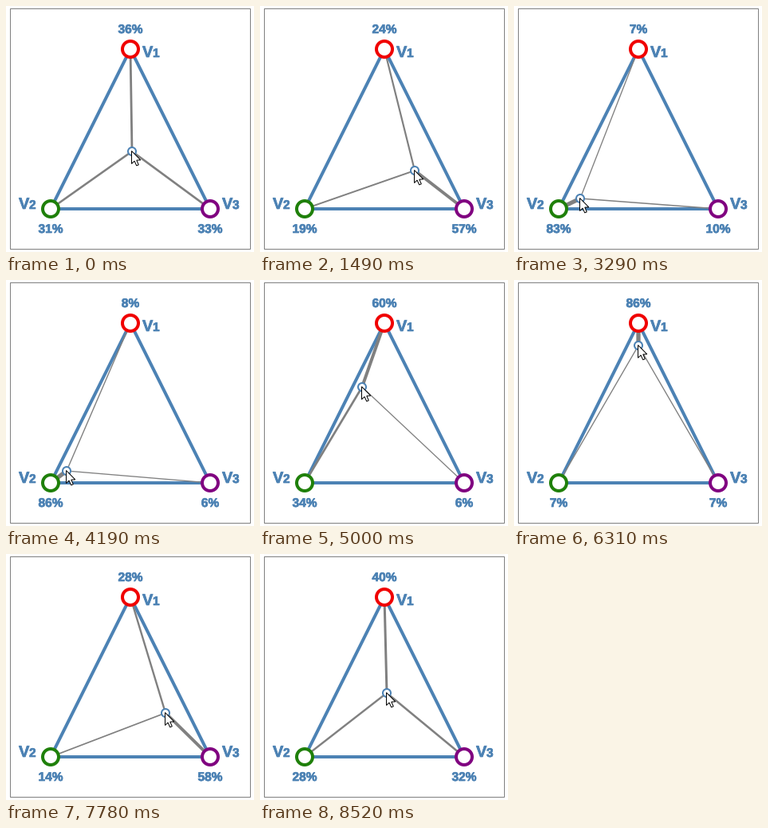
A matplotlib script for the animation above (9.52 s loop, 311 px wide and 308 px high).

```python
import math

import matplotlib.pyplot as plt
from matplotlib.animation import FuncAnimation
from matplotlib.patches import Circle, Polygon, Rectangle
from matplotlib.patheffects import withStroke

WIDTH, HEIGHT, DPI = 311, 308, 100
LOOP_MS, TICK_MS = 9520, 20
PX = 72 / DPI  # points per pixel

BLUE, GRAY = "#4c82b4", "#808080"
CORNERS = [(156, 54), (56, 254), (256, 254)]
RING_COLORS = ["#f00000", "#1f800a", "#800080"]
START = (158, 182)

# first step ms, last step ms, step count, bend point (None = straight), end
MOVES = [
    (840, 1900, 14, None, (209, 216)),
    (2480, 3370, 12, (137.5, 238), (81, 241)),
    (3620, 3860, 4, None, (75, 240)),
    (4190, 5560, 18, None, (155, 80)),
    (6310, 7290, 13, None, (208, 204)),
    (7620, 8520, 12, None, (159, 174)),
]

ARROW = [(0, 0), (0, 16), (3.6, 12.6), (6.2, 18.4), (8.8, 17.3),
         (6.3, 11.6), (11.3, 11.4)]

# keep half-pixel geometry where it is instead of rounding it
plt.rcParams["path.snap"] = False


def smooth(u):
    return u * u * (3 - 2 * u)


def bend(a, c, b, u):
    return (1 - u) ** 2 * a + 2 * u * (1 - u) * c + u * u * b


def handle_at(ms):
    """Whole-pixel handle position; the drag advances in discrete steps."""
    pos = START
    for first, last, steps, mid, end in MOVES:
        if ms < first:
            break
        step = math.floor((ms - first) / (last - first) * (steps - 1) + 0.1)
        u = smooth(min(step + 1, steps) / steps)
        if mid is None:
            mid = [(a + b) / 2 for a, b in zip(pos, end)]
        pos = tuple(bend(a, c, b, u) for a, c, b in zip(pos, mid, end))
    return tuple(math.floor(v + 0.5) for v in pos)


def weights(x, y):
    top = (254 - y) / 200
    lean = (x - 156) / 100
    return [round(w, 4) for w in
            (top, (1 - top - lean) / 2, (1 - top + lean) / 2)]


def label(x, y, text, size, align="center"):
    heavy = withStroke(linewidth=0.7 * PX, foreground=BLUE)
    return ax.text(x, y, text, fontsize=size * PX, color=BLUE, ha=align,
                   va="baseline", family="Liberation Sans", weight="bold",
                   path_effects=[heavy], zorder=5)


def ring(center, radius, width, color, z):
    patch = Circle(center, radius, fc="white", ec=color, lw=width * PX,
                   zorder=z)
    return ax.add_patch(patch)


fig = plt.figure(figsize=(WIDTH / 100, HEIGHT / 100), dpi=DPI,
                 facecolor="white")
ax = fig.add_axes([0, 0, 1, 1])
ax.set_xlim(0, WIDTH)
ax.set_ylim(HEIGHT, 0)
ax.axis("off")

ax.add_patch(Rectangle((5.5, 3.5), 301, 301, fc="none", ec=GRAY, lw=PX,
                       snap=False))
ax.add_patch(Polygon(CORNERS, fc="none", ec=BLUE, lw=4 * PX, zorder=2))
spokes = [ax.plot([], [], color=GRAY, solid_capstyle="butt", zorder=3,
                  snap=False)[0] for _ in CORNERS]
for corner, color in zip(CORNERS, RING_COLORS):
    ring(corner, 10, 4, color, 4)

for i, (x, y) in enumerate([(171, 64), (16, 254), (271, 254)], 1):
    label(x, y, "V", 20, "left")
    label(x + 13, y, str(i), 15.5, "left")
shares = [label(x, y, "", 15.5) for x, y in [(156, 34), (56, 284), (256, 284)]]

handle = ring(START, 5, 2, BLUE, 6)
cursor = ax.add_patch(Polygon(ARROW, fc="white", ec="black", lw=PX,
                              joinstyle="miter", zorder=7))


def update(n):
    x, y = handle_at(n * TICK_MS + TICK_MS / 2)
    for spoke, share, (cx, cy), w in zip(spokes, shares, CORNERS,
                                         weights(x, y)):
        spoke.set_data([x, cx], [y, cy])
        spoke.set_linewidth((1 + 5 * w) * PX)
        share.set_text(f"{math.floor(w * 100 + 0.5)}%")
    handle.center = (x, y)
    cursor.set_xy([(x + dx - 0.5, y + dy - 0.5) for dx, dy in ARROW])
    return [*spokes, *shares, handle, cursor]


anim = FuncAnimation(fig, update, frames=LOOP_MS // TICK_MS,
                     interval=TICK_MS, repeat=True, repeat_delay=0)
plt.show()
```
